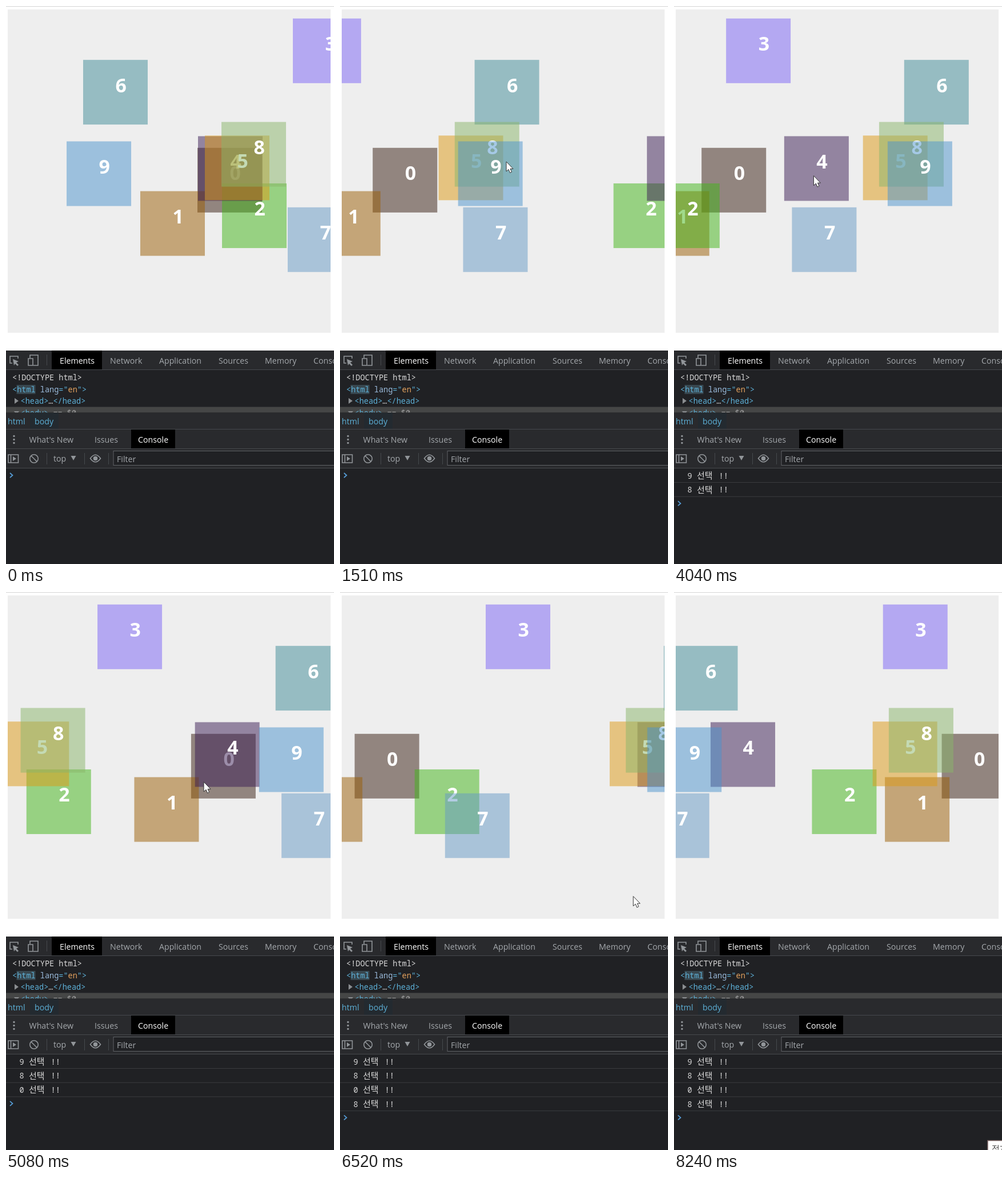
Animation, 574 px wide and 975 px high, one loop 8.3 s. Source, as an HTML page:

```html
<!DOCTYPE html>
<html lang="en">
<head>
<meta charset="utf-8">
<title>Moving boxes</title>
<style>
  html, body { margin: 0; width: 100%; height: 100%; overflow: hidden; background: #fff; }
  svg { display: block; width: 574px; height: 975px; }
  .ui { font: 14.2px "Open Sans", "Noto Sans", sans-serif; fill: #a4a8ac; }
  .mono { font: 13.55px "Noto Sans Mono", "DejaVu Sans Mono", monospace; fill: #d8d8d8; white-space: pre; }
  .ko { font: 300 15px "Noto Sans CJK KR", "Noto Sans CJK", sans-serif; }
  .num { font: 700 30px "Open Sans", "Noto Sans", sans-serif; fill: #fff; }
  .on { fill: #fff; }
  .tag { fill: #5db0d7; }
  .attr { fill: #9bbbdc; }
  .val { fill: #e5a35f; }
  .icon { fill: none; stroke: #919599; stroke-width: 1.6; }
  .rule { stroke: #46494d; }
</style>
</head>
<body>
<svg viewBox="0 0 574 975" xmlns="http://www.w3.org/2000/svg">
  <defs>
    <clipPath id="arena"><rect width="500" height="500"/></clipPath>
    <clipPath id="tree"><rect y="636" width="574" height="74.5"/></clipPath>
  </defs>
  <rect width="574" height="975" fill="#fff"/>
  <rect width="574" height="1" fill="#d4d4d4"/>
  <g transform="translate(3 6) scale(1.13)" clip-path="url(#arena)">
    <rect width="500" height="500" fill="#eee"/>
    <g id="boxes"></g>
  </g>

  <rect y="602" width="574" height="373" fill="#202124"/>
  <rect y="602" width="574" height="33" fill="#292a2d"/>
  <rect x="80" y="602" width="88" height="33" fill="#000"/>
  <path class="rule" d="M0 635.5H574M71.5 609V628"/>
  <g class="icon">
    <path d="M11 624H7V612H21V616"/>
    <path d="M12 617L22 621 18 623 22 627 20 629 16 625 14 628Z" fill="#919599" stroke="none"/>
    <path d="M42 615V610H56V628H48M39 616H47V628H39Z"/>
  </g>
  <g class="ui">
    <text x="94" y="624.5" class="on">Elements</text>
    <text x="182" y="624.5">Network</text>
    <text x="268" y="624.5">Application</text>
    <text x="372" y="624.5">Sources</text>
    <text x="453" y="624.5">Memory</text>
    <text x="538" y="624.5">Console</text>
  </g>

  <g class="mono" clip-path="url(#tree)">
    <rect y="700.5" width="574" height="12" fill="#454646"/>
    <rect x="18.5" y="662" width="33" height="16" fill="#38474f"/>
    <text x="11" y="654">&lt;!DOCTYPE html&gt;</text>
    <text x="11" y="675" class="tag">&lt;html <tspan class="attr">lang</tspan>="<tspan class="val">en</tspan>"&gt;</text>
    <path d="M15 685L22 690 15 695ZM14 708H23L18.500 714Z" fill="#8a8d90"/>
    <text x="25.500" y="695" class="tag">&lt;head&gt;<tspan fill="#d8d8d8">…</tspan>&lt;/head&gt;</text>
    <text x="25.500" y="716" class="tag">&lt;body&gt;<tspan fill="#a0a0a0"> == $0</tspan></text>
  </g>

  <rect y="710.5" width="574" height="97" fill="#292a2d"/>
  <rect x="42" y="711" width="50" height="28" fill="#232a30"/>
  <rect x="219" y="740" width="77" height="33" fill="#000"/>
  <path class="rule" d="M0 739.500H574M0 773.500H574M0 807.500H574M71.500 781V801M137.500 781V801M179.500 781V801"/>
  <rect x="188" y="777.500" width="400" height="25" fill="#202124" stroke="#606367"/>
  <g class="ui">
    <text x="3" y="731" class="tag">html</text>
    <text x="50" y="731" class="tag">body</text>
    <text x="40.500" y="762.500">What's New</text>
    <text x="155" y="762.500">Issues</text>
    <text x="231" y="762.500" class="on">Console</text>
    <text x="83" y="796">top</text>
    <text x="194" y="797">Filter</text>
  </g>
  <g fill="#919599">
    <circle cx="14" cy="751.500" r="1.700"/><circle cx="14" cy="757.500" r="1.700"/><circle cx="14" cy="763.500" r="1.700"/>
    <path d="M113.500 786H122.500L118 794ZM12 787L18 791 12 795Z"/>
  </g>
  <g class="icon">
    <path d="M4 784H21.500V798H4ZM8.500 784V798"/>
    <circle cx="49" cy="791" r="7.200"/>
    <path d="M44 786L54 796"/>
    <path d="M147.500 790.500Q156.500 778 165.500 790.500Q156.500 803 147.500 790.500Z"/>
    <circle cx="156.500" cy="790.500" r="3" fill="#919599"/>
  </g>

  <g id="logs"></g>
  <path id="prompt" d="M7 816L11.500 820 7 824" fill="none" stroke="#559bd4" stroke-width="1.800"/>
  <g id="tip">
    <rect x="549" y="958.500" width="60" height="30" fill="#fff" stroke="#806a68" stroke-width="1.500"/>
    <text x="556" y="979" class="ko" fill="#555">정지</text>
  </g>
  <path id="cursor" d="M0 0V17L4 13.500 6.500 19.500 9.500 18 7 12.500H12Z" fill="#fff" stroke="#333" stroke-width="1"/>
</svg>
<script>
const LOOP = 8300, STEP = 8240 / 120;
const $ = id => document.getElementById(id);

function add(parent, name, attrs, text = "") {
  const node = document.createElementNS("http://www.w3.org/2000/svg", name);
  for (const key in attrs) node.setAttribute(key, attrs[key]);
  node.textContent = text;
  return parent.appendChild(node);
}

// x, y, speed per tick, colour at half opacity
const boxes = [
  [293.8, 214, 4, "56,30,18"],
  [205.3, 281, 4, "156,94,4"],
  [331.9, 269, 1, "66,182,24"],
  [441.6, 14, 1, "124,100,248"],
  [294.7, 196, 2, "58,28,84"],
  [305.3, 195, 5, "222,154,20"],
  [116.8, 78, 1, "64,140,152"],
  [433.6, 306, 4, "102,154,198"],
  [331, 174, 5, "138,182,106"],
  [91.2, 204, 1, "76,148,206"]
].map(([x, y, speed, rgb], i) => {
  const node = add($("boxes"), "g", {});
  add(node, "rect", { width: 100, height: 100, fill: `rgba(${rgb},.5)` });
  add(node, "text", { x: 50, y: 50, class: "num" }, i);
  return { x, y, speed, node };
});

// time and number of each selected box
const logs = [[1720, 9], [3260, 8], [4950, 0], [5950, 8]].map(([time, num], i) => {
  const node = add($("logs"), "g", { class: "mono", transform: `translate(0 ${i * 24.7})` });
  add(node, "text", { x: 23.5, y: 825.5 }, num);
  add(node, "text", { x: 40, y: 826, class: "ko" }, "선택");
  add(node, "text", { x: 78.5, y: 825.5 }, "!!");
  add(node, "path", { d: "M0 832.5H574", stroke: "#3a3c3f" });
  return { time, node };
});

const ticks = [[0, 0], [22, 89], [39, 157], [59, 237], [74, 298], [95, 382], [120, 480]];

const pointer = [
  [400, 530, 655], [900, 400, 420], [1300, 291, 272], [1700, 291, 272],
  [2300, 200, 330], [2690, 162, 318], [3200, 165, 220], [3600, 190, 260],
  [4040, 243, 296], [4500, 300, 320], [4900, 340, 335], [5080, 346, 332],
  [5800, 380, 225], [6000, 390, 220], [6520, 513, 530], [7130, 550, 839],
  [7500, 560, 980]
];

function sample(keys, at, col) {
  const i = Math.max(1, keys.findIndex(k => k[0] >= at));
  const a = keys[i - 1], b = keys[i];
  return a[col] + (b[col] - a[col]) * (at - a[0]) / (b[0] - a[0]);
}

// runs right, then restarts just left of the arena
function boxX({ x, speed }, tick) {
  const first = Math.ceil((500 - x) / speed);
  return tick < first ? x + speed * tick : -100 + speed * ((tick - first) % (600 / speed));
}

const show = (node, on) => node.setAttribute("visibility", on ? "visible" : "hidden");

function draw(now) {
  const step = Math.min(120, Math.floor((now % LOOP + 12) / STEP));
  const time = step * STEP;
  const tick = Math.round(sample(ticks, step, 1));
  for (const box of boxes)
    box.node.setAttribute("transform", `translate(${boxX(box, tick)} ${box.y})`);

  let count = 0;
  for (const log of logs) {
    const on = time >= log.time;
    show(log.node, on);
    count += on;
  }
  $("prompt").setAttribute("transform", `translate(0 ${count * 24.6})`);

  const inside = time >= 400 && time <= 7500;
  show($("cursor"), inside);
  if (inside)
    $("cursor").setAttribute("transform", `translate(${sample(pointer, time, 1)} ${sample(pointer, time, 2)})`);
  show($("tip"), time >= 8020);
}

const start = performance.now();
function frame() {
  draw(performance.now() - start);
  requestAnimationFrame(frame);
}
frame();
</script>
</body>
</html>
```
